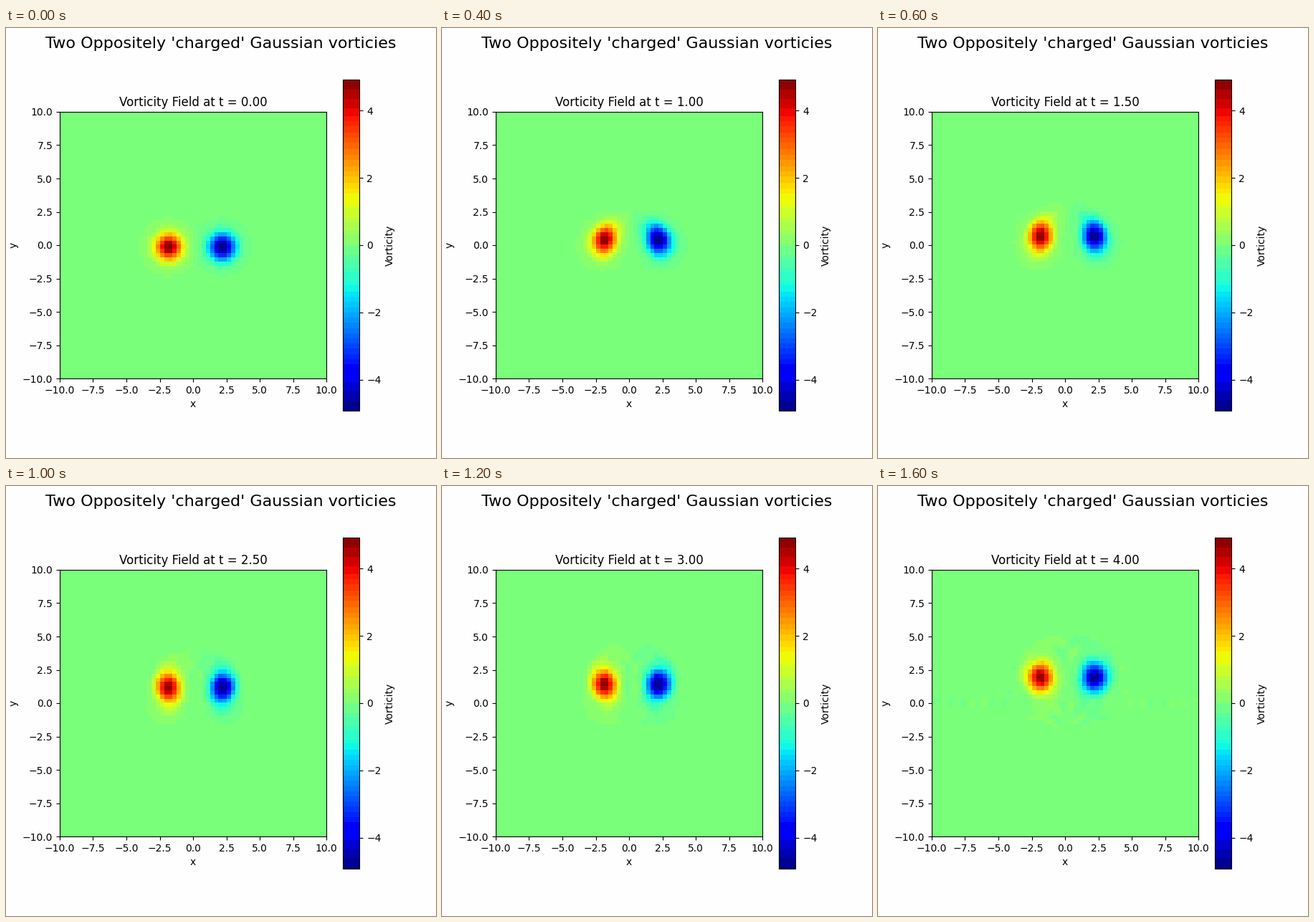
A matplotlib script for the animation above (1.8 s loop, 600x600 px).

```python
import numpy as np
import matplotlib.pyplot as plt
from matplotlib.animation import FuncAnimation
from matplotlib.colors import ListedColormap

N, SIZE = 64, 20.0
FRAMES, INTERVAL = 9, 200
STEP, STEPS_PER_FRAME = 0.05, 10
VISCOSITY = 0.001

# Periodic grid and spectral operators
grid = -SIZE / 2 + np.arange(N) * SIZE / N
X, Y = np.meshgrid(grid, grid)
k = 2 * np.pi * np.fft.fftfreq(N, SIZE / N)
KX, KY = np.meshgrid(k, k)
K2 = KX**2 + KY**2
INV_K2 = 1 / np.where(K2 == 0, 1, K2)
INV_K2[0, 0] = 0
KEEP = (abs(KX) < k.max() * 2 / 3) & (abs(KY) < k.max() * 2 / 3)


def real(spectrum):
    return np.fft.ifft2(spectrum).real


def gaussian(x0, strength):
    return strength * np.exp(-((X - x0) ** 2 + Y**2))


def rate(wh):
    """Time derivative of the vorticity spectrum; rows run downwards."""
    psi = -wh * INV_K2
    u, v = real(1j * KY * psi), real(-1j * KX * psi)
    advection = u * real(1j * KX * wh) + v * real(1j * KY * wh)
    return -np.fft.fft2(advection) * KEEP - VISCOSITY * K2 * wh


def rk4(wh, dt):
    a = rate(wh)
    b = rate(wh + dt / 2 * a)
    c = rate(wh + dt / 2 * b)
    d = rate(wh + dt * c)
    return wh + dt / 6 * (a + 2 * b + 2 * c + d)


def simulate():
    start = gaussian(-2, 5) + gaussian(2, -5)
    fields, wh = [start], np.fft.fft2(start)
    for _ in range(FRAMES - 1):
        for _ in range(STEPS_PER_FRAME):
            wh = rk4(wh, STEP)
        fields.append(real(wh))
    return fields


def banded_jet():
    """Jet with neighbouring shades merged into flat bands."""
    rgb = plt.get_cmap("jet")(np.arange(256), bytes=True)[:, :3].astype(int)
    _, band = np.unique(rgb // [32, 16, 32], axis=0, return_inverse=True)
    band = band.ravel()
    means = [rgb[band == b].mean(axis=0) for b in range(band.max() + 1)]
    return ListedColormap(np.array(means)[band] / 255)


fields = simulate()
fig, ax = plt.subplots(figsize=(6, 6), dpi=100, facecolor="#fefefe")
fig.suptitle("Two Oppositely 'charged' Gaussian vorticies", fontsize=16)
image = ax.imshow(fields[0], cmap=banded_jet(), extent=(-10, 10, -10, 10),
                  interpolation="nearest")
fig.colorbar(image, ax=ax, label="Vorticity")
ax.set_xlabel("x")
ax.set_ylabel("y")
title = ax.set_title("")


def draw(i):
    image.set_data(fields[i])
    title.set_text(f"Vorticity Field at t = {i * STEP * STEPS_PER_FRAME:.2f}")
    return image, title


anim = FuncAnimation(fig, draw, frames=FRAMES, interval=INTERVAL,
                     repeat=True, repeat_delay=0)
plt.show()
```
